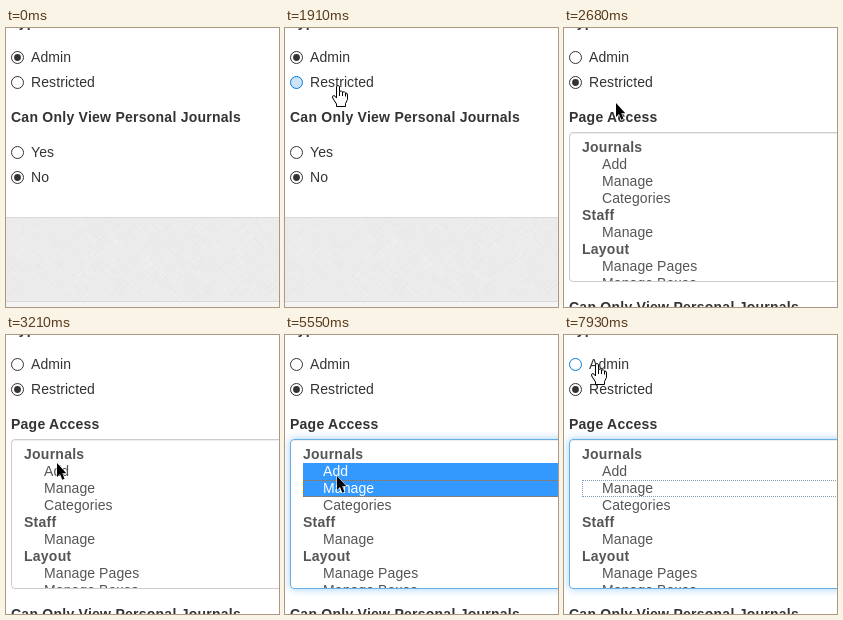
An HTML page with a canvas for the animation above (8000 ms loop, 273 by 279 pixels).

```html
<!DOCTYPE html>
<html lang="en">
<head>
<meta charset="utf-8">
<style>
html, body { margin: 0; width: 100%; height: 100%; overflow: hidden; background: #fff; }
body { position: relative; font: 14px/20px "Liberation Sans", Arial, sans-serif; letter-spacing: .09px; color: #333; }
body > *, .abs, .radio, .low > * { position: absolute; white-space: nowrap; }
b { letter-spacing: .25px; }
.radio { left: 5px; padding-left: 20px; }
.radio svg { position: absolute; left: 0; top: 4px; }
.panel { left: 0; top: 79px; width: 310px; }
.panel > b { left: 5px; top: 0; }
.list { left: 5px; top: 25px; width: 300px; height: 150px; box-sizing: border-box; overflow: hidden;
  border: 1px solid #ccc; border-radius: 4px; padding: 6px 12px; color: #555; }
.list div { width: 290px; height: 17px; line-height: 16px; padding-left: 20px; outline-offset: -1px; }
.list .group { padding-left: 0; font-weight: bold; letter-spacing: .25px; }
.low { left: 0; top: 0; width: 273px; height: 279px; }
.foot { top: 189px; left: 0; width: 273px; height: 83px; border: solid #d9d9d9; border-width: 1px 0; background: #ebebeb; }
.end { top: 274px; left: 0; width: 273px; height: 300px; background: #f4f4f4; }
#cursor { left: 0; top: 0; overflow: visible; }
</style>
</head>
<body>
<b style="left:5px;top:-16px">Type</b>
<div class="radio" id="admin" style="top:19px">Admin</div>
<div class="radio" id="restricted" style="top:44px">Restricted</div>

<div class="panel" id="panel">
  <b class="abs">Page Access</b>
  <div class="list abs" id="list">
    <div class="group">Journals</div>
    <div>Add</div>
    <div>Manage</div>
    <div>Categories</div>
    <div class="group">Staff</div>
    <div>Manage</div>
    <div class="group">Layout</div>
    <div>Manage Pages</div>
    <div>Manage Boxes</div>
  </div>
</div>

<div class="low" id="low">
  <b style="left:5px;top:79px">Can Only View Personal Journals</b>
  <div class="radio" id="yes" style="top:114px">Yes</div>
  <div class="radio" id="no" style="top:139px">No</div>
  <canvas class="foot" id="foot" width="273" height="83"></canvas>
  <div class="end"></div>
</div>

<svg id="cursor" width="20" height="24">
  <path id="arrow" d="M0 0V14L3 11L5.3 16.8L7.5 15.8L5.2 10.2H9.3Z" stroke="#fff" paint-order="stroke"/>
  <g id="hand" fill="#fff" stroke="#000" stroke-linejoin="round">
    <path d="M-1.5 13V1.5Q0 -.7 1.5 1.5V6.5Q3.5 5.2 4.8 7Q6.6 6.2 7.6 8Q9.5 7.6 9.5 10V14.5L7.5 18.5V21.5H-1.5V19L-5.3 13Q-6 10.5 -4.2 10.5Q-3 10.7 -1.5 13Z"/>
    <path d="M1.5 6.5V11M4.5 7V11M7.5 8V11.5" fill="none"/>
  </g>
</svg>

<script>
const $ = id => document.getElementById(id);
const LOOP = 8000, START = 580, TICK = 77.3;
const BLUE = '#0078d7';

// cursor way points: tick, x, y
const path = [
  [0, 176, 208], [4, 73, 71], [6, 73, 71], [10, 53, 57], [26, 53, 57], [27, 52, 75],
  [34, 51, 128], [47, 51, 128], [48, 51, 131], [51, 51, 150], [52, 51, 150], [53, 51, 151],
  [63, 51, 151], [65, 52, 137], [74, 52, 137], [79, 51, 149], [89, 51, 149], [95, 33, 28]
];

// option clicks: tick, selected rows, focused row
const clicks = [[44, [1], 1], [56, [1, 2], 2], [70, [2], 1], [82, [], 2]];

function cursorAt(k) {
  const i = path.findIndex(p => p[0] >= k);
  if (i < 0) return path.at(-1).slice(1);
  if (i === 0) return path[0].slice(1);
  const [a, x0, y0] = path[i - 1], [b, x1, y1] = path[i];
  const p = (k - a) / (b - a), e = p * (2 - p);
  return [Math.round(x0 + (x1 - x0) * e), Math.round(y0 + (y1 - y0) * e)];
}

function radio(id, checked, hover, pressed) {
  const ink = hover ? BLUE : '#333', fill = pressed ? '#cce4f7' : '#fff';
  $(id).querySelector('svg').innerHTML =
    `<circle cx="6.5" cy="6.5" r="6" fill="${fill}" stroke="${ink}"/>` +
    (checked ? `<circle cx="6.5" cy="6.5" r="3.4" fill="${ink}"/>` : '');
}

function paintFooter() {
  const c = $('foot').getContext('2d');
  let seed = 7;
  const rnd = () => (seed = seed * 16807 % 2147483647) / 2147483647;
  for (let i = 0; i < 900; i++) {
    const x = rnd() * 273, y = rnd() * 83, n = 3 + rnd() * 9, dir = rnd() < .5 ? 1 : -1;
    c.strokeStyle = rnd() < .5 ? 'rgba(255,255,255,.2)' : 'rgba(0,0,0,.015)';
    c.beginPath();
    c.moveTo(x, y);
    c.lineTo(x + n, y + n * dir);
    c.stroke();
  }
}

function drawList(k) {
  const [, selected, focus] = clicks.findLast(c => k >= c[0]) || [0, [], -1];
  [...$('list').children].forEach((row, i) => {
    const on = selected.includes(i);
    row.style.background = on ? '#3399ff' : '';
    row.style.color = on ? '#fff' : '';
    const dots = on ? '#cc6600' : selected.length ? '#3399ff' : '#7f9db9';
    row.style.outline = i === focus ? `1px dotted ${dots}` : '';
  });
  const glow = k < 44 ? 0 : k < 45 ? .5 : 1;
  $('list').style.borderColor = ['#ccc', '#99bedb', '#66afe9'][glow * 2];
  $('list').style.boxShadow =
    `inset 0 1px 1px rgba(0,0,0,.075), 0 0 8px rgba(102,175,233,${.6 * glow})`;
}

function draw(t) {
  const k = Math.floor((t - START) / TICK);
  const [x, y] = cursorAt(k);
  const over = (top, right) => k >= 0 && x < right && y >= top && y < top + 20;
  const onAdmin = over(19, 65), onRestricted = over(44, 90);

  $('cursor').style.display = k < 0 ? 'none' : '';
  $('cursor').style.transform = `translate(${x}px,${y}px)`;
  $('hand').style.display = onAdmin || onRestricted ? '' : 'none';
  $('arrow').style.display = onAdmin || onRestricted ? 'none' : '';

  const open = k >= 19;
  radio('admin', !open, onAdmin);
  radio('restricted', open, onRestricted, k === 17 || k === 18);

  const p = open ? Math.min(1, (k - 18.05) * TICK / 400) : 0;
  const slide = .5 - Math.cos(p * Math.PI) / 2;
  $('panel').style.height = 175 * slide + 'px';
  $('panel').style.overflow = p < 1 ? 'hidden' : 'visible';
  $('low').style.transform = `translateY(${Math.round(190 * slide)}px)`;
  drawList(k);
}

document.querySelectorAll('.radio').forEach(r =>
  r.insertAdjacentHTML('beforeend', '<svg width="13" height="13"></svg>'));
radio('yes', false);
radio('no', true);
paintFooter();

const begin = performance.now();
function loop() {
  draw((performance.now() - begin) % LOOP);
  requestAnimationFrame(loop);
}
loop();
</script>
</body>
</html>
```
